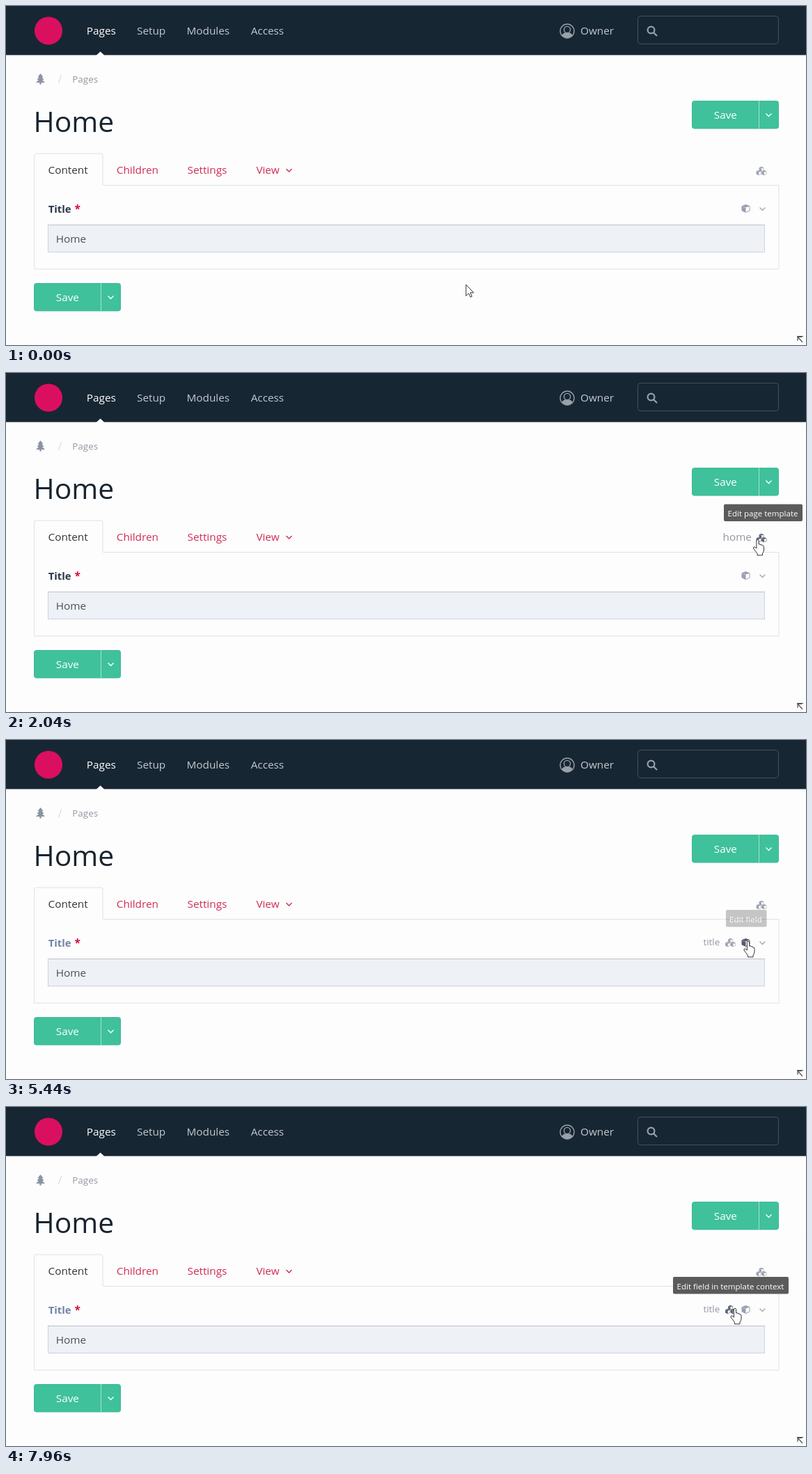
Animation, 1149 px wide and 487 px high, one loop 8000 ms. Source, as an HTML page:

```html
<!DOCTYPE html>
<html lang="en">
<head>
<meta charset="utf-8">
<title>Page editor</title>
<style>
html, body { margin: 0; width: 100%; height: 100%; overflow: hidden; background: #fdfdfd; }
svg { display: block; width: 1149px; height: 487px; font: 15.3px "Open Sans", "Noto Sans", sans-serif; }
.small { font-size: 13.4px; }
.tip text { font-size: 11.54px; fill: #fff; }
.tip rect { fill: #5b5b5b; }
.link { fill: #cf2c55; }
.grey { fill: #9397a0; }
.line { fill: none; stroke-width: 1.4; }
.icon { color: #9a9fb0; }
.pointer { fill: #fff; stroke: #333; stroke-linejoin: round; }
</style>
</head>
<body>
<svg viewBox="0 0 1149 487">
  <defs>
    <g id="cube">
      <path d="M0-5.5 5.5-3.4V3L0 5.5-5.5 3V-3.4Z" fill="#fdfdfd" stroke="currentColor"/>
      <path d="M-5.5-3.2 0-1V5.5L-5.5 3ZM0-5.5 5.5-3.4 0-1.6-5.5-3.4Z" fill="currentColor"/>
    </g>
    <g id="cubes">
      <use href="#cube" transform="translate(0-2.8)scale(.56)"/>
      <use href="#cube" transform="translate(-3.8 2.6)scale(.6)"/>
      <use href="#cube" transform="translate(3.8 2.6)scale(.6)"/>
    </g>
    <path id="chevron" d="M-4-2 0 2 4-2"/>
    <g id="save">
      <rect x=".5" y=".5" width="124" height="39.5" rx="3" fill="#3fc19b" stroke="#3eba97"/>
      <path d="M96.5 0V40.5" stroke="#a5e2d0"/>
      <text x="31.8" y="26" fill="#fff">Save</text>
      <use href="#chevron" x="110.5" y="20.5" class="line" stroke="#fff"/>
    </g>
  </defs>

  <rect width="1149" height="70.5" fill="#172633"/>
  <circle cx="61" cy="35.5" r="20" fill="#db0f60"/>
  <path d="M129.5 71 135.5 65.5 141.5 71Z" fill="#fdfdfd"/>
  <g fill="#c3c9cf">
    <text x="115.8" y="41" fill="#fff">Pages</text>
    <text x="188" y="41">Setup</text>
    <text x="259.5" y="41">Modules</text>
    <text x="351.7" y="41">Access</text>
    <text x="825" y="41">Owner</text>
  </g>
  <g class="line" stroke="#98a1aa">
    <circle cx="806" cy="36" r="10"/>
    <path d="M798.5 42Q800 38.5 803 38.5H809Q812 38.5 813.5 42Q806 50 798.5 42Z" fill="#98a1aa" stroke="none"/>
    <circle cx="806" cy="34" r="4.6" fill="#172633"/>
    <rect x="907.5" y="14.5" width="202" height="40" rx="4" stroke="#43515f" stroke-width="1"/>
    <g stroke-width="2.2"><circle cx="926.5" cy="34.5" r="4.9"/><path d="M930 38 935 43"/></g>
  </g>

  <path d="M49.5 97 53.5 102H51.5L54.5 106H52L56 110H50.7V112.5H48.3V110H43L47 106H44.5L47.5 102H45.5Z" fill="#8b93a3"/>
  <path d="M75.5 111 79.5 99" stroke="#cfd3da"/>
  <text x="95.3" y="109.5" class="small grey">Pages</text>
  <text x="39.6" y="181" font-size="40.8" fill="#18242f">Home</text>
  <use href="#save" x="985" y="136"/>
  <use href="#save" x="40" y="398"/>

  <path d="M139.5 257.5H1110V378H40.5V215Q40.5 212 43.5 212H136Q139 212 139 215V257.5" fill="none" stroke="#dfe1e8"/>
  <text x="60.5" y="241" fill="#303438">Content</text>
  <g class="link">
    <text x="158.8" y="241">Children</text>
    <text x="260.6" y="241">Settings</text>
    <text x="359.4" y="241">View</text>
  </g>
  <use href="#chevron" x="406.5" y="236" class="line" stroke="#cf2c55"/>

  <text x="60.7" y="296.5" font-weight="700" font-size="14.8" id="label">Title</text>
  <text x="98.5" y="297" font-weight="700" fill="#d5093c">*</text>
  <rect x="60.5" y="314.5" width="1029" height="39" fill="#eef1f5" stroke="#cdd3e6"/>
  <path d="M60 314.5H1090" stroke="#bfc3cb"/>
  <text x="71.7" y="340" fill="#4c5055">Home</text>

  <use href="#cubes" x="1085" y="237" class="icon" id="templateIcon"/>
  <text x="1029.5" y="241" class="grey" id="templateName">home</text>
  <g id="fieldName">
    <text x="1001.5" y="295" class="small grey">title</text>
    <use href="#cubes" x="1040.5" y="291" class="icon" id="contextIcon"/>
  </g>
  <use href="#cube" x="1062.5" y="291" class="icon" id="fieldIcon"/>
  <use href="#chevron" x="1086.5" y="291.5" class="line" stroke="#a5a9b6"/>

  <g class="tip" id="templateTip"><rect x="1031" y="188.5" width="113" height="24.5" rx="2"/><text x="1036.5" y="206">Edit page template</text></g>
  <g class="tip" id="fieldTip"><rect x="1034" y="244" width="58.5" height="24.5" rx="2"/><text x="1039" y="261.5">Edit field</text></g>
  <g class="tip" id="contextTip"><rect x="958" y="244" width="166" height="24.5" rx="2"/><text x="963.5" y="261.5">Edit field in template context</text></g>

  <path d="M1137 481V475.5H1143M1137.5 476 1144 483M1136 474.5H1145" fill="none" stroke="#4b5058" stroke-width="1.2"/>

  <g id="cursor">
    <path id="arrow" class="pointer" d="M.5.5V16.5L4.3 13 6.8 18.3 9 17.3 6.6 12H11.5Z"/>
    <path id="hand" class="pointer" d="M-1.6 1.8Q-1.6.4 0 .4T1.6 1.8V7Q4 5.8 4.3 8Q6.7 7 6.9 9Q9 8.6 9 10.6V15Q9 18 7 20V22.8H-.5V20.3Q-3 17-6 13Q-6.6 10.8-4.4 10.8L-1.6 13Z"/>
    <path id="beam" d="M-3-8H-1L0-7 1-8H3M0-7V7M-3 8H-1L0 7 1 8H3" fill="none" stroke="#222"/>
  </g>
</svg>
<script>
const LOOP = 8000;
const path = [
  [0, 660, 400], [840, 859, 304], [1640, 1079.5, 239], [2100, 1079.5, 239],
  [2480, 1086, 240], [4240, 1086, 240], [4680, 1079.5, 260], [5400, 1066, 289],
  [7100, 1066, 289], [7500, 1047, 289], [LOOP, 1047, 289]
];
// Fade-in start, fade-out start, duration
const fades = {
  templateName: [1620, 4440, 150],
  templateTip: [1800, 4420, 120],
  fieldName: [5190, 9000, 200],
  fieldTip: [5400, 7220, 120],
  contextTip: [7460, 9000, 120]
};
const hovers = { templateIcon: [1600, 4360], fieldIcon: [5190, 7250], contextIcon: [7330, 9000] };

const el = id => document.getElementById(id);
const clamp = v => Math.max(0, Math.min(1, v));
const within = (v, [a, b]) => v >= a && v < b;

function position(t) {
  const i = path.findIndex(p => p[0] > t);
  const [t0, x0, y0] = path[i - 1], [t1, x1, y1] = path[i];
  const k = (t - t0) / (t1 - t0);
  return [x0 + (x1 - x0) * k, y0 + (y1 - y0) * k];
}

function draw(now) {
  const t = now % LOOP, [x, y] = position(t);
  const onLabel = within(y, [258, 314]);
  const onIcon = within(t, hovers.templateIcon);
  const shape = onLabel || onIcon ? 'hand' : within(y, [314, 354]) ? 'beam' : 'arrow';

  el('cursor').setAttribute('transform', `translate(${x} ${y})`);
  for (const id of ['arrow', 'hand', 'beam']) el(id).style.display = id === shape ? '' : 'none';
  el('label').style.fill = onLabel ? '#7183a6' : '#2b3545';
  for (const id in fades) {
    const [start, end, span] = fades[id];
    el(id).style.opacity = clamp((t - start) / span) * clamp(1 - (t - end) / span);
  }
  for (const id in hovers) el(id).style.color = within(t, hovers[id]) ? '#555b6b' : '';
  requestAnimationFrame(draw);
}
requestAnimationFrame(draw);
</script>
</body>
</html>
```
